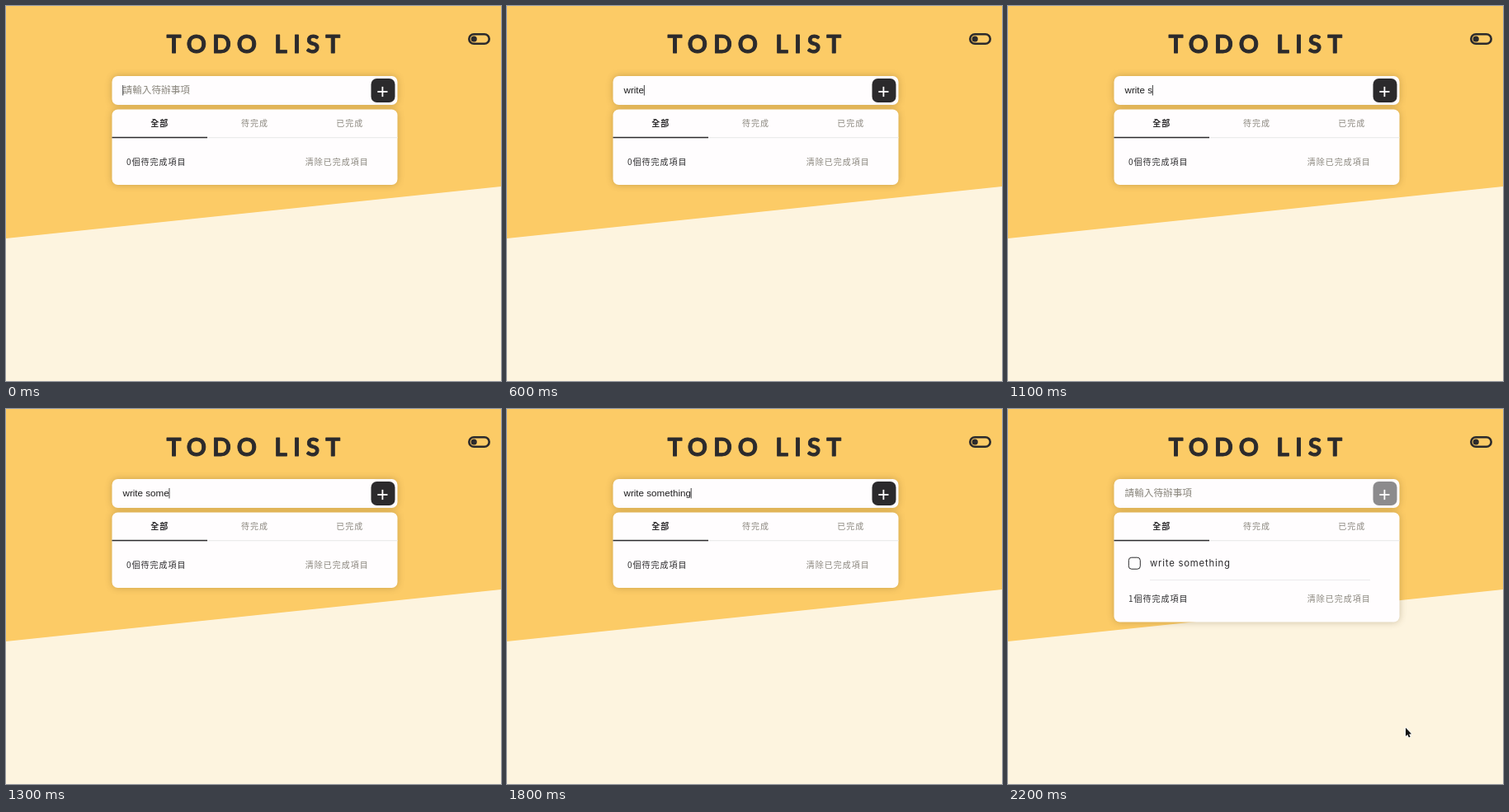
Recreate the animation shown at these times as an HTML page with a canvas. Size 600 by 455 pixels, loop 2.25 s.

```html
<!DOCTYPE html>
<html lang="zh-Hant">
<head>
<meta charset="utf-8">
<title>Todo list</title>
<style>
html, body { margin: 0; width: 100%; height: 100%; overflow: hidden; background: #fdf4df; }
canvas { display: block; width: 600px; height: 455px; }
</style>
</head>
<body>
<canvas id="stage"></canvas>
<script>
const W = 600, H = 455, LOOP = 2250;
const DARK = '#2b2a2c', GRAY = '#89857c', WHITE = '#fffdfe';
const CJK = '"Noto Sans CJK TC", "Noto Sans CJK", sans-serif';
const ARIAL = '"Liberation Sans", Arial, sans-serif';
const PHRASE = 'write something';
// When each character of the phrase is typed, in ms.
const KEYS = [50, 150, 300, 450, 600, 750, 1100, 1150, 1200, 1300, 1500, 1550, 1650, 1750, 1800];
const ADDED = 2000, HOVER = 2050, LEAVE = 2100, STOP = 2200;

const canvas = document.getElementById('stage');
const ctx = canvas.getContext('2d');
const dpr = window.devicePixelRatio || 1;
canvas.width = W * dpr;
canvas.height = H * dpr;

const clamp = v => Math.max(0, Math.min(1, v));
const mix = (a, b, p) => a + (b - a) * p;

function rect(x, y, w, h, color) {
  ctx.fillStyle = color;
  ctx.fillRect(x, y, w, h);
}

function round(x, y, w, h, r) {
  ctx.beginPath();
  ctx.roundRect(x, y, w, h, r);
}

function card(x, y, w, h) {
  ctx.save();
  ctx.shadowColor = 'rgba(90, 65, 20, 0.3)';
  ctx.shadowBlur = 8 * dpr;
  ctx.fillStyle = WHITE;
  round(x, y, w, h, 7);
  ctx.fill();
  ctx.restore();
}

function text(str, x, y, font, color, spacing = 0) {
  ctx.font = font;
  ctx.letterSpacing = spacing + 'px';
  ctx.fillStyle = color;
  ctx.fillText(str, x, y);
}

function poly(points) {
  ctx.beginPath();
  points.forEach(([x, y]) => ctx.lineTo(x, y));
  ctx.closePath();
}

function drawBackground() {
  rect(0, 0, W, H, '#fdf4df');
  ctx.fillStyle = '#fccb66';
  poly([[0, 0], [W, 0], [W, 219], [0, 282]]);
  ctx.fill();
}

function drawHeader() {
  const title = 'TODO LIST';
  text(title, 194.5, 57, 'bold 30px Lato, sans-serif', DARK, 7);
  ctx.strokeStyle = DARK;
  ctx.lineJoin = 'round';
  ctx.lineWidth = 0.9;
  ctx.strokeText(title, 194.5, 57);

  ctx.lineWidth = 2.6;
  round(561.3, 34.2, 24.4, 11.6, 5.8);
  ctx.stroke();
  ctx.fillStyle = DARK;
  ctx.beginPath();
  ctx.arc(567.2, 40, 3.6, 0, Math.PI * 2);
  ctx.fill();
}

function drawInput(t) {
  card(128.5, 85, 346, 35);
  const typed = t < ADDED ? PHRASE.slice(0, KEYS.filter(k => k <= t).length) : '';
  if (typed) text(typed, 141.5, 106, '11.64px ' + ARIAL, '#1c1b1c');
  else text('請輸入待辦事項', 141.5, 106.2, '11.64px ' + CJK, GRAY);

  const caretOn = !(t >= 950 && t < 1100) && t < LEAVE;
  if (caretOn) {
    const shift = typed ? ctx.measureText(typed).width : 0;
    rect(141.3 + shift, 96, 0.9, 12.5, DARK);
  }

  const fade = clamp((t - HOVER + 50) / 150);
  ctx.globalAlpha = mix(1, 0.54, fade);
  ctx.fillStyle = DARK;
  round(442.5, 88, 29, 29, 7);
  ctx.fill();
  ctx.globalAlpha = 1;
  rect(450.3, 103.1, 12.2, 1.8, WHITE);
  rect(455.5, 97.9, 1.8, 12.2, WHITE);
}

function drawList(added) {
  card(128.5, 125.5, 346, added ? 133 : 91.5);
  const small = '10px ' + CJK;
  text('全部', 175.3, 146, 'bold ' + small, DARK, 1);
  text('待完成', 285, 146, small, GRAY, 1);
  text('已完成', 400.3, 146, small, GRAY, 1);
  rect(244, 159, 230.5, 1.3, '#ececec');
  rect(128.5, 158.8, 115.5, 1.5, DARK);

  if (added) {
    ctx.strokeStyle = DARK;
    ctx.lineWidth = 1;
    round(146.3, 180.2, 14, 14, 3.5);
    ctx.stroke();
    text(PHRASE, 172, 191, '11.3px Inter, sans-serif', DARK, 0.8);
    rect(172, 207, 267, 1, '#ebeaec');
  }
  const y = added ? 234 : 192.5;
  text((added ? 1 : 0) + '個待完成項目', 146, y, small, DARK, 1);
  text('清除已完成項目', 362.7, y, small, GRAY, 1);
}

function drawPointer(t) {
  if (t < LEAVE) return;
  const p = clamp((t - LEAVE) / (STOP - LEAVE));
  ctx.save();
  ctx.translate(mix(458, 482, p), mix(104, 386.8, p));
  poly([[0, 0], [0, 10.3], [2.3, 8.2], [3.9, 11.8], [5.6, 11], [4.1, 7.6], [7.1, 7.4]]);
  ctx.strokeStyle = '#fff';
  ctx.lineWidth = 1.4;
  ctx.stroke();
  ctx.fillStyle = '#111';
  ctx.fill();
  ctx.restore();
}

function draw(now) {
  // The picture advances in 50 ms steps.
  const t = Math.floor((now % LOOP) / 50) * 50;
  ctx.setTransform(dpr, 0, 0, dpr, 0, 0);
  drawBackground();
  drawHeader();
  drawInput(t);
  drawList(t >= ADDED);
  drawPointer(t);
}

const start = performance.now();
function tick() {
  draw(performance.now() - start);
  requestAnimationFrame(tick);
}
tick();
</script>
</body>
</html>
```
